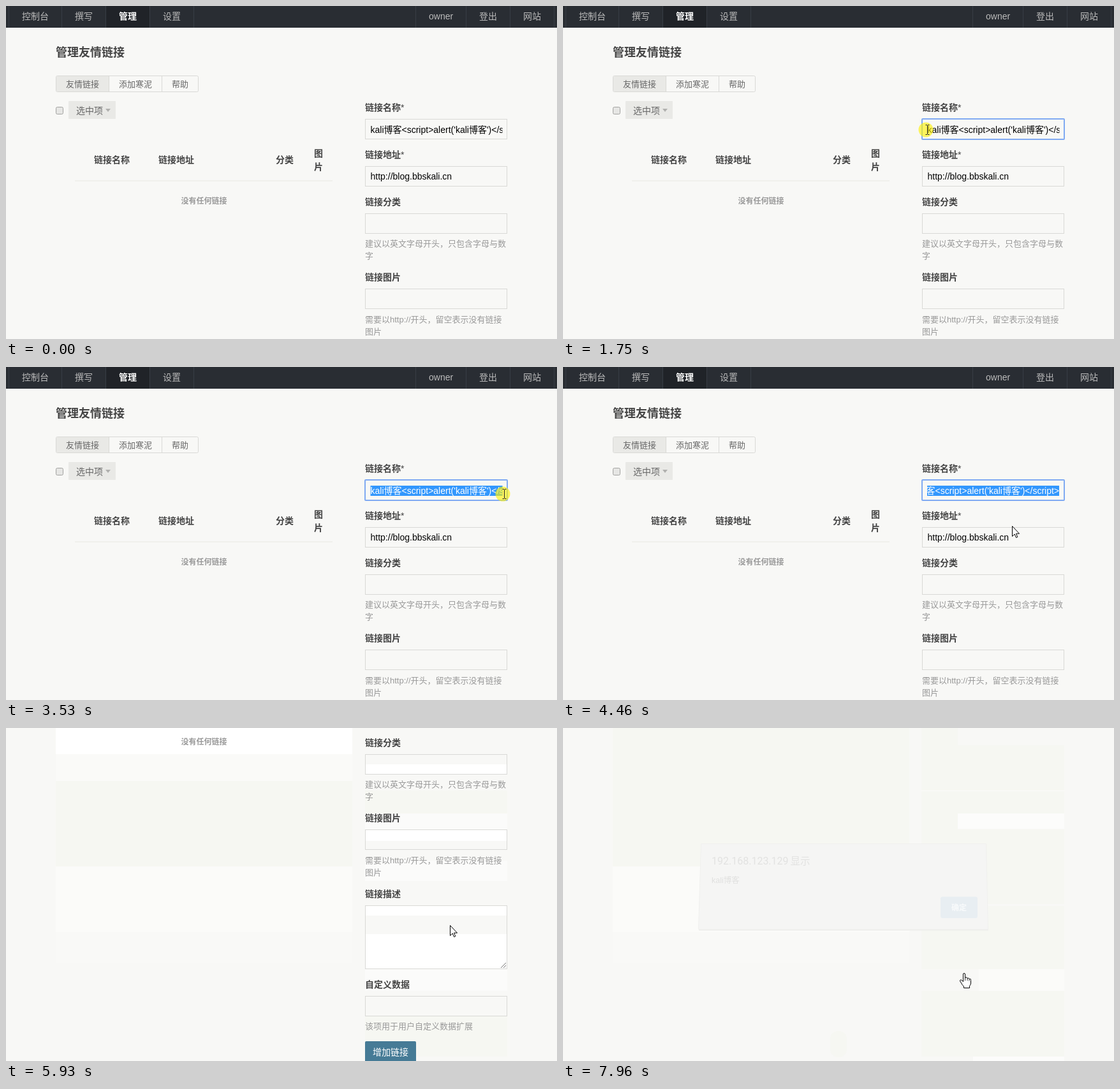
An HTML page that plays this animation: 864x522 px, repeating every 8 s.

```html
<!DOCTYPE html>
<html lang="zh-CN">
<head>
<meta charset="utf-8">
<style>
html, body { margin: 0; width: 100%; height: 100%; overflow: hidden; background: #f8f8f6; }
svg { display: block; font-family: 'Liberation Sans', 'Noto Sans CJK SC', 'Noto Sans CJK', sans-serif; }
text { white-space: pre; }
</style>
</head>
<body>
<svg id="stage" width="864" height="522" viewBox="0 0 864 522"></svg>
<script>
const LOOP = 8000;
const CODE = "kali博客<script>alert('kali博客')<\/script>";
const FIELD_X = 571.5, FIELD_W = 206.5;
const $ = id => document.getElementById(id);
const esc = s => s.replace(/&/g, '&amp;').replace(/</g, '&lt;');

// cy is the middle of the CJK em box
const text = (x, cy, s, size = 14, fill = '#444', more = '') =>
  `<text x="${x}" y="${cy + size * 0.38}" font-size="${size}" fill="${fill}" ${more}>${esc(s)}</text>`;
const bold = (x, cy, s, size = 14, fill = '#444') => text(x, cy, s, size, fill, 'font-weight="700"');
const rect = (x, y, w, h, fill, more = '') =>
  `<rect x="${x}" y="${y}" width="${w}" height="${h}" fill="${fill}" ${more}/>`;
const box = (y, h = 32) =>
  rect(563.5, y + 0.5, 222, h - 1, 'none', 'stroke="#d9d9d6"');
const band = (x, right, fill) => ([y, bottom]) => rect(x, y, right - x, bottom - y, fill);

const FIELDS = [[177, 209], [251, 283], [325, 357], [443, 475], [562, 662], [704, 736]];

function nav() {
  let s = rect(0, 0, 864, 34, '#292d33') + rect(157, 0, 68, 34, '#202328');
  for (const x of [4, 87, 156, 225, 294, 642, 721, 790, 859]) s += rect(x, 0, 1, 34, '#383d45');
  const items = [[25, '控制台'], [108, '撰写'], [246, '设置'], [663, 'owner'], [742, '登出'], [811, '网站']];
  for (const [x, label] of items) s += text(x, 16, label, 14, '#bbbbbb');
  return s + bold(177, 16, '管理', 14, '#fff');
}

function list() {
  return bold(78, 72, '管理友情链接', 18) +
    rect(78.5, 109.5, 223, 25, 'none', 'rx="2" stroke="#d9d9d6"') +
    rect(79, 110, 82, 24, '#e9e9e6') + rect(161, 110, 1, 24, '#d9d9d6') + rect(244, 110, 1, 24, '#d9d9d6') +
    text(94, 122, '友情链接', 13, '#666') + text(177, 122, '添加寒泥', 13, '#666') + text(260, 122, '帮助', 13, '#666') +
    rect(78.5, 158.5, 11, 11, '#e6e6e4', 'rx="2" stroke="#a2a2a0"') +
    rect(98, 149, 74, 28, '#e9e9e6', 'rx="1"') + text(110, 163.5, '选中项', 14, '#666') +
    '<path d="M156 161h8l-4 5z" fill="#b0b0ae"/>' +
    bold(138, 241, '链接名称') + bold(239, 241, '链接地址') + bold(423, 241, '分类') +
    bold(483, 231, '图') + bold(483, 252, '片') +
    rect(108, 273, 404, 2, '#f0f0ec') +
    bold(274.5, 305.5, '没有任何链接', 12, '#999');
}

function form() {
  const labels = [[159, '链接名称'], [233, '链接地址'], [307, '链接分类'], [425, '链接图片'], [544, '链接描述'], [686, '自定义数据']];
  const hints = [[372, '建议以英文字母开头，只包含字母与数'], [391, '字'], [491, '需要以http://开头，留空表示没有链接'],
    [510, '图片'], [751, '该项用于用户自定义数据扩展']];
  return labels.map(([y, s]) => bold(563, y, s)).join('') +
    text(619, 159, '*') + text(619, 233, '*') +
    hints.map(([y, s]) => text(563, y, s, 13, '#999')).join('') +
    FIELDS.map(([a, b]) => box(a, b - a)).join('') +
    '<path d="M776 660l8-8M780 660l4-4" stroke="#777" fill="none"/>' +
    rect(563, 177, 223, 32, 'none', 'id="focus" rx="1" stroke="#80aaf2" stroke-width="2"') +
    `<g clip-path="url(#view)"><g id="name">
      ${text(FIELD_X, 193.5, CODE, 14, '#000')}
      ${rect(FIELD_X, 186, 0, 16, '#3297fd', 'id="sel"')}
      <g clip-path="url(#selView)">${text(FIELD_X, 193.5, CODE, 14, '#fff')}</g>
    </g></g>` +
    text(FIELD_X, 266.5, 'http://blog.bbskali.cn', 14, '#000') +
    rect(563, 775, 80, 34, '#467b96', 'id="add" rx="2"') + text(575, 792, '增加链接', 14, '#fff') +
    '<circle cx="432" cy="890" r="13" fill="#e3e3e0"/>';
}

const GREEN = '#f6f7f2', PALE = '#fbfbf9';
const scrollBands =
  rect(78, 0, 465, 41, '#fff') + rect(78, 41, 465, 42, '#fafaf8') + rect(78, 83, 465, 134, GREEN) +
  [[134, 159], [208, 240], [378, 412]].map(band(563, 786, '#fbfbfa')).join('') +
  [[57, 73], [159, 177], [278, 294], [323, 378]].map(band(563, 786, '#fff')).join('') +
  [[98, 134], [452, 515]].map(band(563, 786, GREEN)).join('');
const blankBands =
  [[27, 134], [159, 276], [279, 378], [412, 515]].map(band(562, 786, GREEN)).join('') +
  rect(562, 98, 224, 1, PALE) + rect(562, 0, 57, 27, GREEN) + rect(562, 134, 57, 25, GREEN) +
  rect(619, 134, 167, 24, '#fcfcfb') + rect(652, 378, 134, 34, PALE) + rect(643, 515, 143, 7, '#fcfcfb') +
  rect(419, 475, 26, 41, GREEN, 'rx="12"');
const dialog =
  '<path d="M213 316.500H667" stroke="#eeeeec" stroke-width="2"/>' +
  '<path d="M216.500 181.500H663.500L666.500 315.500H212.500Z" fill="#f5f5f4" stroke="#f0f0ee"/>' +
  text(233, 208, '192.168.123.129', 16, '#e2e2e1', 'font-family="Roboto, sans-serif"') +
  text(356.5, 208, '显示', 15.5, '#e2e2e1') +
  text(233, 238, 'kali博客', 12.5, '#e0e0df') +
  rect(592, 264.5, 58, 33.5, '#e8eef2', 'rx="3"') + bold(609, 281, '确定', 12, '#f8fafb');

$('stage').innerHTML = `
  <defs>
    <clipPath id="view"><rect x="${FIELD_X - 0.5}" y="178" width="${FIELD_W + 1}" height="30"/></clipPath>
    <clipPath id="selView">${rect(FIELD_X, 186, 0, 16, '#000', 'id="selClip"')}</clipPath>
  </defs>
  ${rect(0, 0, 864, 522, '#f8f8f6')}
  <g id="settled">${rect(78, 0, 465, 217, GREEN)}</g>
  <g id="lower">${rect(78, 217, 465, 103, PALE)}${rect(78, 320, 465, 48, '#f9f9f7')}</g>
  <g id="moving">${scrollBands}</g>
  <g id="page">${nav()}${list()}${form()}</g>
  <g id="blank">${blankBands}${dialog}</g>
  <circle id="ring" r="11.5" fill="#fff200" opacity=".62"/>
  <g id="mouse" stroke-linejoin="round">
    <path id="arrow" d="M.5 .5V16.500L4.200 13 6.600 18.500 8.800 17.500 6.500 12.200H11.500Z" fill="#fff" stroke="#000"/>
    <path id="beam" d="M-2.500 -7.500H0M1 -7.500H3.500M.5 -7V7M-2.500 7.500H0M1 7.500H3.500" fill="none" stroke="#222"/>
    <g id="hand" stroke="#000">
      <path d="M-1.500 2Q-1.500 .5 0 .5 1.500 .5 1.500 2V8Q2.500 6.500 4 7 5.300 7.300 5.300 9 6 7.800 7.300 8.200 8.300 8.500 8.300 10 9.300 9 10.300 9.600 10.500 10 10.500 11.500V16Q10.500 18 8.500 20.500V23.500H-.5V21Q-3 19 -4.300 16L-6.300 13Q-6.800 11 -5.300 10.700 -4 10.700 -1.500 13.500Z" fill="#fff"/>
      <path d="M1.500 8V12M5 9V12M8 10V12.500" fill="none" stroke-width=".8"/>
    </g>
  </g>`;

// [time, x, y] of the pointer
const PATH = [[350, 760, 505], [890, 574, 212], [1060, 574, 212], [1270, 575, 202], [1440, 571, 194],
  [1780, 571, 194], [2210, 631, 195], [2900, 715, 195], [3070, 733, 196], [3600, 788, 199], [3920, 790, 203],
  [4060, 790, 196], [4460, 704, 249], [4760, 709, 267], [5160, 709, 267], [5460, 696, 309],
  [6330, 696, 309], [6860, 629, 384]];
const SCROLL = [[5780, 95], [5850, 190], [5930, 284], [6010, 360], [6100, 400]];

const pen = document.createElement('canvas').getContext('2d');
pen.font = "14px 'Liberation Sans', 'Noto Sans CJK SC', 'Noto Sans CJK', sans-serif";
const edges = Array.from({ length: CODE.length + 1 }, (_, i) => pen.measureText(CODE.slice(0, i)).width);
const fullWidth = edges[CODE.length];

const within = (t, a, b) => t >= a && t < b;
const ramp = (t, a, b) => Math.min(1, Math.max(0, (t - a) / (b - a)));
const show = (id, on) => $(id).setAttribute('visibility', on ? 'visible' : 'hidden');

// pointers sit on whole pixels
function pointer(t) {
  const i = PATH.findIndex(k => k[0] > t);
  if (i < 0) return PATH[PATH.length - 1].slice(1);
  if (i === 0) return PATH[0].slice(1);
  const [t0, x0, y0] = PATH[i - 1], [t1, x1, y1] = PATH[i], p = ramp(t, t0, t1);
  return [Math.round(x0 + (x1 - x0) * p), Math.round(y0 + (y1 - y0) * p)];
}

function selection(t, x) {
  if (!within(t, 1780, 4930)) return 0;
  if (t >= 3550) return fullWidth;
  let n = 0;
  while (n < CODE.length && FIELD_X + (edges[n] + edges[n + 1]) / 2 < x) n++;
  return edges[n];
}

function draw(t) {
  const [x, y] = pointer(t);
  const scroll = SCROLL.reduce((v, [at, to]) => t >= at ? to : v, 0);
  const left = t >= 7960;

  $('page').setAttribute('transform', `translate(0 ${-scroll})`);
  show('page', !left);
  show('blank', left);
  show('lower', t >= 5930);
  show('moving', within(t, 5780, 6100));
  show('settled', t >= 6100);

  // field focus, text shift and selection
  $('focus').setAttribute('stroke-opacity', within(t, 1440, 5780) ? 1 : 0);
  $('focus').setAttribute('y', t < 4930 ? 177 : 251);
  const shift = t < 4930 ? ramp(t, 3550, 3850) * (fullWidth - FIELD_W) : 0;
  $('name').setAttribute('transform', `translate(${-shift} 0)`);
  const sel = selection(t, x);
  $('sel').setAttribute('width', sel);
  $('selClip').setAttribute('width', sel);

  // button hover fade
  const h = ramp(t, 6860, 7180), mix = (a, b) => Math.round(a + (b - a) * h);
  $('add').setAttribute('fill', `rgb(${mix(70, 60)},${mix(123, 106)},${mix(150, 129)})`);

  const dragging = within(t, 1440, 4060);
  const pressed = dragging || within(t, 4930, 5080) || within(t, 7180, 7330);
  show('ring', pressed);
  $('ring').setAttribute('cx', x - 2);
  $('ring').setAttribute('cy', y);

  const seen = t >= 350;
  const hand = t > 6400 && y >= 375;
  const overField = x >= 563 && x <= 786 && FIELDS.some(([a, b]) => y + scroll >= a && y + scroll < b);
  const beam = !hand && (dragging || (overField && !within(t, 5460, 6400)));
  $('mouse').setAttribute('transform', `translate(${x} ${y})`);
  show('hand', seen && hand);
  show('beam', seen && beam);
  show('arrow', seen && !hand && !beam);
}

const start = performance.now();
function tick() {
  draw((performance.now() - start) % LOOP);
  requestAnimationFrame(tick);
}
tick();
</script>
</body>
</html>
```
